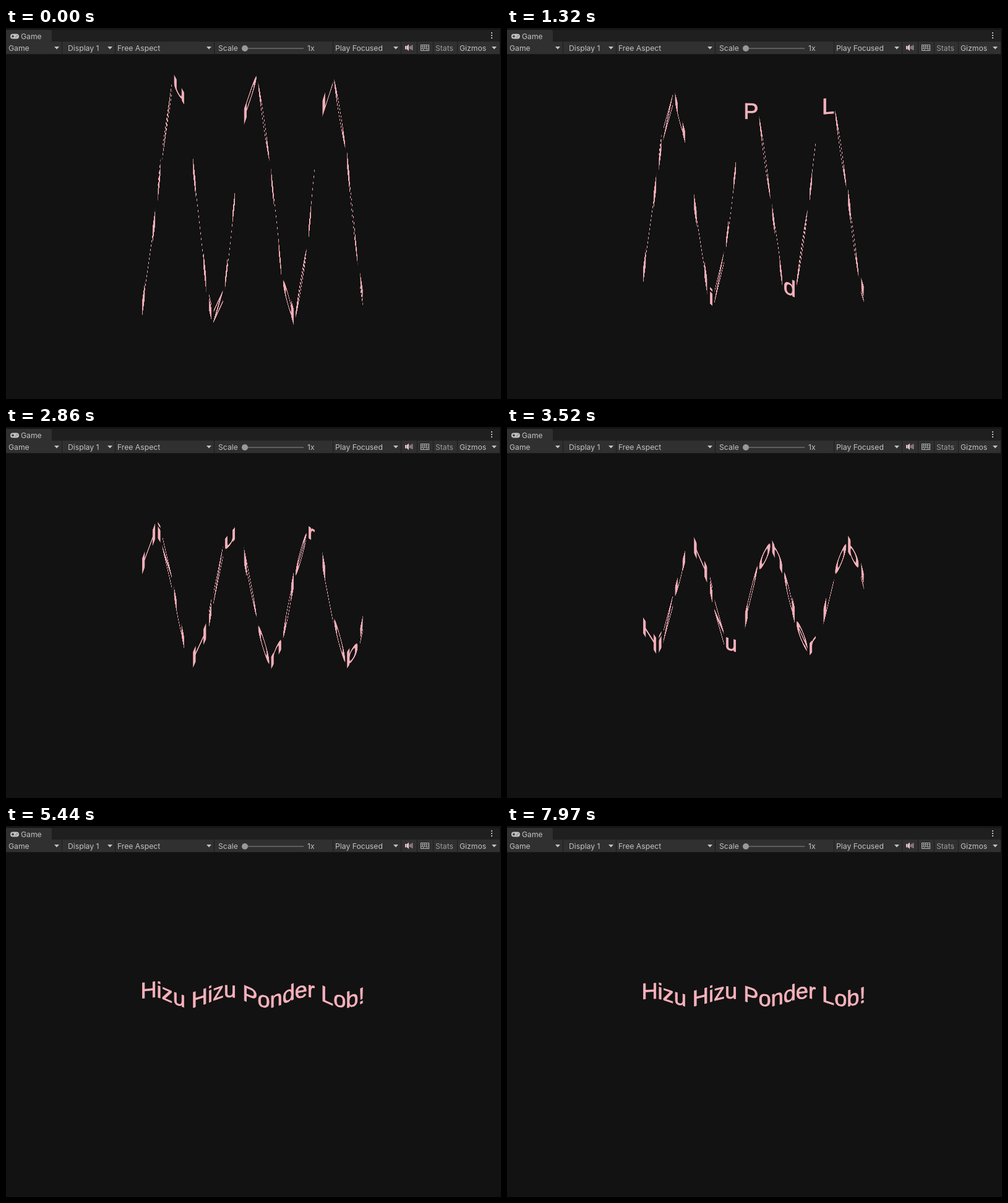
Animation, 800 px wide and 600 px high, one loop 8000 ms. Source, as an HTML page with a canvas:

```html
<!DOCTYPE html>
<html lang="en">
<head>
<meta charset="utf-8">
<title>Wavy text</title>
<style>
  html, body { margin: 0; width: 100%; height: 100%; overflow: hidden; background: #121212; }
  canvas, svg { position: absolute; left: 0; top: 0; display: block; }
  text { font: 12.2px Inter, sans-serif; fill: #c2c2c2; }
  .dim { fill: #9c9c9c; }
  .icon { fill: #c2c2c2; }
</style>
</head>
<body>
<canvas id="stage" width="800" height="600"></canvas>
<svg width="800" height="43" viewBox="0 0 800 43">
  <rect width="800" height="3" fill="#151515"/>
  <rect y="3" width="798" height="19" fill="#1f1f1f"/>
  <path d="M0 22V3H71Q74 3 74 6V22Z" fill="#303030"/>
  <rect y="22" width="798" height="20" fill="#303030"/>
  <rect y="42" width="798" height="1" fill="#1a1a1a"/>
  <path d="M90.5 22V42M176.5 22V42M336.5 22V42M528.5 22V42M638.5 22V42M664.5 22V42M690.5 22V42M729.5 22V42" stroke="#1c1c1c"/>

  <rect x="7" y="9.5" width="14" height="8" rx="4" class="icon"/>
  <path d="M9 13.5h4M11 11.5v4M15.5 14.5h1M17.5 12.5h1" stroke="#303030" stroke-width="1.3"/>
  <path d="M784 7h2v2h-2zM784 11h2v2h-2zM784 15h2v2h-2z" class="icon"/>
  <path d="M78 30h8l-4 4.5zM164 30h8l-4 4.5zM324 30h8l-4 4.5zM626 30h8l-4 4.5zM785 30h8l-4 4.5z" class="icon"/>

  <rect x="386" y="32" width="95" height="2" fill="#5e5e5e"/>
  <circle cx="386" cy="33" r="5" fill="#999"/>

  <path d="M645 29h2.500v5.500H645zM648 29l3-2.500v10.500l-3-2.500z" fill="#e6c6d2"/>
  <path d="M652.700 29.500v4.500M654.700 28.500v6.500M656.700 27.500v8.500" stroke="#d9b4c2" fill="none"/>
  <rect x="670.5" y="27.5" width="13" height="9" fill="none" stroke="#b8b8b8"/>
  <path d="M671 30.500h12M671 33.500h12M673.500 28v5M676.500 28v5M679.500 28v5M674.500 34v3M680.500 34v3" stroke="#a8a8a8" stroke-width=".9"/>

  <text x="24" y="18">Game</text>
  <text x="4" y="37">Game</text>
  <text x="100" y="37">Display 1</text>
  <text x="180" y="37">Free Aspect</text>
  <text x="343" y="37">Scale</text>
  <text x="487" y="37">1x</text>
  <text x="532" y="37">Play Focused</text>
  <text x="694" y="37" class="dim">Stats</text>
  <text x="733" y="37">Gizmos</text>
</svg>
<script>
const LOOP = 8000;
const MESSAGE = 'Hizu Hizu Ponder Lob!';
const FONT = '36.2px "Liberation Sans", Arial, sans-serif';
const COLOR = '#f7b1bb';
const START_X = 217.4, BASELINE = 285.2;
const WAVE_NUMBER = 2 * Math.PI / 125, WAVE_SPEED = 5, WAVE_ORIGIN = 244.9;
const PAD = 1;
// [ms, wave height in px]
const HEIGHTS = [[0, 199], [600, 197], [1320, 165], [2260, 129], [3520, 85], [4520, 45], [5500, 7], [LOOP, 7]];

const ctx = document.getElementById('stage').getContext('2d');
const strip = { x: 210, width: 380, ascent: 32, height: 46, scale: 2 };
const flat = document.createElement('canvas');
flat.width = strip.width;
flat.height = strip.height * strip.scale;

// Draws the straight text once and returns the extent of each glyph's quad.
function layoutGlyphs() {
  const pen = flat.getContext('2d');
  pen.scale(1, strip.scale);
  pen.font = FONT;
  pen.fillStyle = pen.strokeStyle = COLOR;
  pen.lineWidth = 0.8;
  pen.lineJoin = 'round';
  let x = START_X;
  return [...MESSAGE].map(char => {
    const size = pen.measureText(char);
    pen.fillText(char, x - strip.x, strip.ascent);
    pen.strokeText(char, x - strip.x, strip.ascent);
    const glyph = {
      blank: char === ' ',
      from: x,
      to: x + size.width,
      left: x - size.actualBoundingBoxLeft - PAD,
      right: x + size.actualBoundingBoxRight + PAD
    };
    x = glyph.to;
    return glyph;
  });
}

const glyphs = layoutGlyphs();

function heightAt(ms) {
  const i = HEIGHTS.findIndex(([end]) => end > ms);
  const [t0, h0] = HEIGHTS[i - 1], [t1, h1] = HEIGHTS[i];
  return h0 + (h1 - h0) * (ms - t0) / (t1 - t0);
}

function draw(ms) {
  const height = heightAt(ms);
  const lift = x => height * Math.sin(WAVE_NUMBER * (x - WAVE_ORIGIN) + WAVE_SPEED * ms / 1000);
  ctx.fillStyle = '#121212';
  ctx.fillRect(0, 0, 800, 600);
  for (const { blank, from, to, left, right } of glyphs) {
    if (blank) continue;
    const start = lift(left), slope = (lift(right) - start) / (right - left);
    // One pixel column at a time, so steep strokes break into dashes.
    for (let x = Math.round(from); x < Math.round(to); x++) {
      const y = BASELINE - strip.ascent - start - slope * (x + 0.5 - left);
      ctx.drawImage(flat, x - strip.x, 0, 1, flat.height, x, y, 1, strip.height);
    }
  }
}

const begin = performance.now();
function tick() {
  draw((performance.now() - begin) % LOOP);
  requestAnimationFrame(tick);
}
tick();
</script>
</body>
</html>
```
